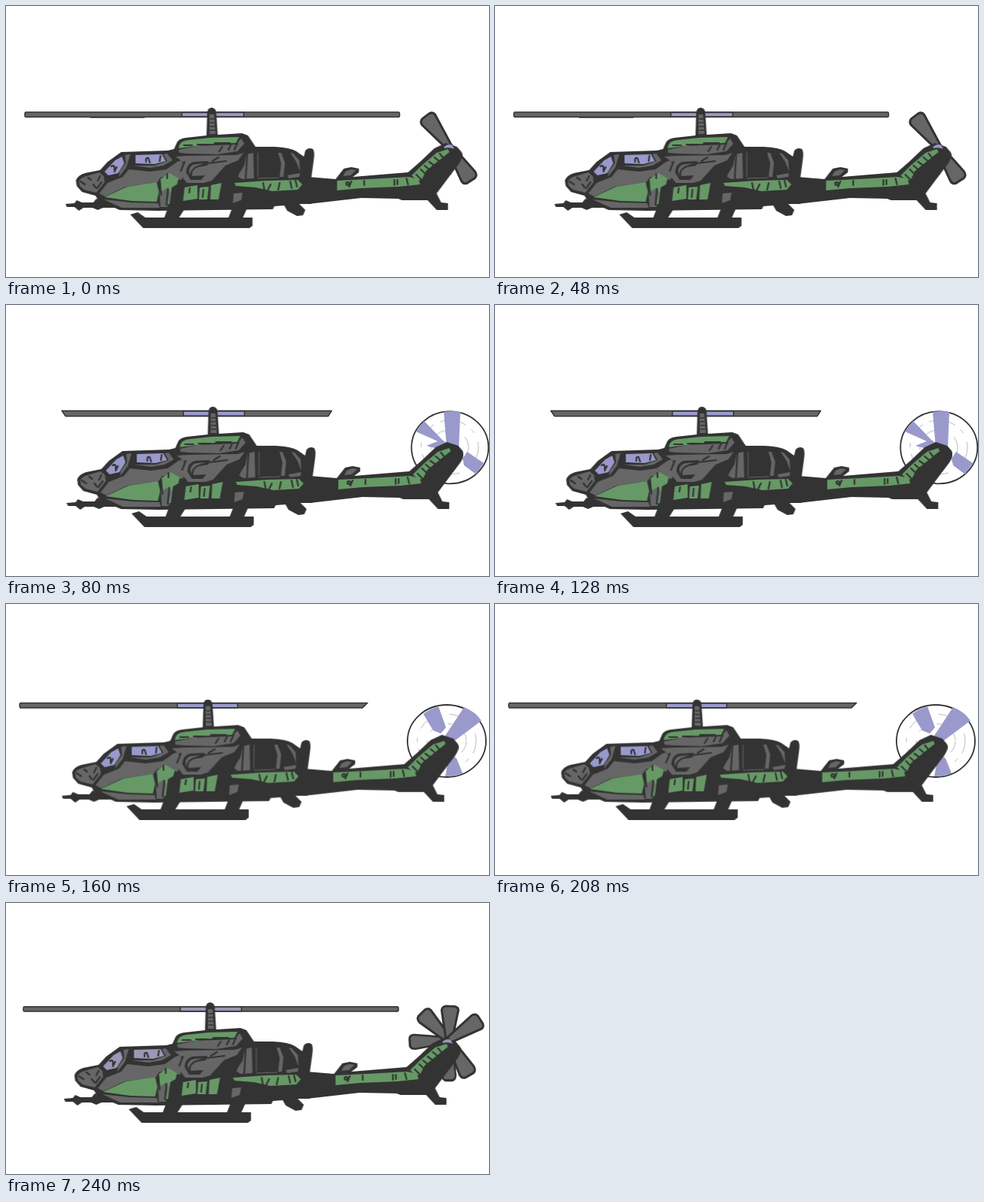
Write an HTML page that moves like this. It is 640 by 360 pixels and loops after 320 ms.

```html
<!DOCTYPE html>
<html lang="en">
<head>
<meta charset="utf-8">
<title>Helicopter</title>
<style>
  html, body { margin: 0; width: 100%; height: 100%; overflow: hidden; background: #fff; }
  svg { display: block; width: 100%; height: 100%; color: #9999cc; }
  .dark { fill: #333; }
  .grey { fill: #666; }
  .green { fill: #669966; }
  .lilac { fill: currentColor; }
  .edge { stroke: #333; stroke-width: 1.5; stroke-linejoin: round; }
  .ink { fill: none; stroke: #333; stroke-width: 2.2; stroke-linecap: round; stroke-linejoin: round; }
  .disc { fill: #fff; stroke: #333; stroke-width: 1.8; }
  .swirl { fill: none; stroke: #bbb; stroke-width: 1; stroke-dasharray: 17 9 6 13; }
  .pose { opacity: 0; }
</style>
</head>
<body>
<svg id="stage" viewBox="0 0 640 360">
  <defs>
    <path id="blade" d="M-4 0L-11-44Q-11-50-6-51L6-51Q11-50 11-45L4 0Z" fill="#666" stroke="#333" stroke-width="3" stroke-linejoin="round"/>
  </defs>

  <!-- Main and tail rotors, one group per pose -->
  <g class="pose">
    <rect class="grey edge" x="25" y="141" width="496.5" height="6.5" rx="1.5"/>
    <rect class="lilac edge" x="233" y="141.4" width="82" height="5.7"/>
    <path class="ink" style="stroke-width:1.2" d="M112 148.2H183"/>
    <g transform="translate(587 187)">
      <use href="#blade" transform="rotate(-37)"/>
      <use href="#blade" transform="rotate(147) scale(1 1.05)"/>
    </g>
  </g>
  <g class="pose">
    <path class="grey edge" d="M74 140.6H431.5L427 147.7H79Z"/>
    <rect class="lilac edge" x="235" y="141" width="81" height="6.3"/>
    <ellipse class="disc" cx="588.3" cy="189.3" rx="51" ry="48"/>
    <ellipse class="swirl" cx="588" cy="189" rx="38" ry="36"/>
    <ellipse class="swirl" cx="588" cy="189" rx="25" ry="23"/>
    <path class="lilac" d="M580 142Q591 140 602 142L600 190H584ZM543 168L554 154 578 179 590 188 576 192 557 187 572 181ZM605 204L611 195 633 210 623 225 607 213Z"/>
  </g>
  <g class="pose">
    <path class="grey edge" d="M19 131.5H479L472 138.1H19Q17 134 19 131.5Z"/>
    <rect class="lilac edge" x="227" y="131.9" width="80" height="5.8"/>
    <ellipse class="disc" cx="584" cy="182" rx="52" ry="48"/>
    <ellipse class="swirl" cx="584" cy="182" rx="39" ry="36"/>
    <ellipse class="swirl" cx="584" cy="182" rx="26" ry="23"/>
    <path class="lilac" d="M553 146Q562 139 573 136L583 164 576 172 566 168ZM607 137Q622 143 630 155L594 182 578 181ZM582 229L588 200 597 205 605 225Q594 229 582 229Z"/>
  </g>
  <g class="pose">
    <rect class="grey edge" x="23" y="137.7" width="497" height="6.4" rx="1.5"/>
    <rect class="lilac edge" x="231" y="138.1" width="81" height="5.6"/>
    <g transform="translate(587 182)">
      <use href="#blade" transform="rotate(180) scale(.8 1.05)"/>
      <use href="#blade" transform="rotate(150) scale(1 1.06)"/>
      <use href="#blade" transform="rotate(-93) scale(.85 1.02)"/>
      <use href="#blade" transform="rotate(-45)"/>
      <use href="#blade" transform="rotate(2) scale(1 .88)"/>
      <use href="#blade" transform="rotate(57) scale(1 .97)"/>
    </g>
  </g>

  <g id="body">
    <!-- Mast -->
    <path class="dark" d="M265 172L266 140Q267 134 272 134Q278 135 278 141L280 172Z"/>
    <path class="grey" d="M269 143H275L277 169H269Z"/>
    <path class="ink" style="stroke-width:1.5" d="M270 149h5M270 154h5M270 159h6M270 164h6"/>

    <!-- Silhouette: hull, tail, skids, gun -->
    <g class="dark">
      <path d="M92 231Q94 224 104 221L124 217 134 206 152 193 214 191 222 189 226 180Q229 175 238 174L265 171 312 168 320 171 330 186 355 186Q376 187 384 192L394 199 396 191Q400 186 406 189Q409 192 407 205L404 227V262H388L396 270 393 277 385 278 372 271 368 264 355 265 353 269 200 271 150 270 122 258 118 251 100 246 93 238Z"/>
      <path d="M400 226L436 229 447 215 457 213 467 215 467 220 459 226 532 220 548 206 567 188 582 181 597 186 603 193Q606 199 600 208L570 248 576 260 585 261V270H570L558 257H524L519 255 470 254 400 262Z"/>
      <path d="M164 276L174 273 184 280H326V291L322 294H181ZM214 267H237L227 283H208ZM300 265H320L312 283H293Z"/>
      <path d="M78 262L90 261 93 257 100 260H115L119 255 127 258 146 262V267H128L121 270 114 267H102L96 271 90 266H80Z"/>
    </g>

    <!-- Nose and cockpit -->
    <path class="grey" d="M96 232Q98 227 106 225L123 220 129 225 130 233 119 247 103 243 97 238Z"/>
    <path class="ink" d="M98 232L104 236M108 227L112 230M124 225L121 231M115 236L118 240M126 233L120 241"/>
    <path class="grey" d="M123 248L134 234 154 226 162 216 190 219 212 216 226 206 232 204 236 215 232 230 205 226 200 233 158 239 131 252Z"/>
    <path class="lilac" d="M130 219L144 204 153 199 156 208 148 221 135 224Z"/>
    <path class="lilac" d="M171 197L206 196 211 205 196 209 171 208Z"/>
    <path class="grey" d="M157 197L164 196 159 213 149 226 150 219 158 208ZM208 196L213 195 220 204 208 211 190 214 168 211 196 211 213 205Z"/>
    <path class="ink" d="M139 212Q144 209 143 217M143 219L146 213M185 206Q184 200 188 201L190 207M204 198L203 205"/>
    <path class="green" d="M130 253L160 239 199 233 202 246 199 259 166 258Z"/>
    <path class="grey" d="M129 256L165 260 201 261 203 267 153 267Z"/>
    <path class="green" d="M204 229L216 221 228 228 226 236 219 240 216 262 206 264Z"/>
    <path class="grey" d="M203 247L214 240 217 247 213 266 204 266Z"/>
    <path class="ink" d="M203 230L205 250M213 222V228M214 242L212 263"/>

    <!-- Cowling -->
    <path class="green" d="M229 184Q231 178 242 177L270 174 308 173 304 181 274 182 228 188Z"/>
    <path class="grey" d="M228 190L252 185 304 183 311 175 315 182 306 192 280 196 240 195 229 194Z"/>
    <path class="ink" d="M235 184H246M253 183H269M276 181H296M286 186L282 192M297 184L294 190M306 181L302 190"/>
    <path class="grey" d="M224 199L240 198 305 197 314 194 307 204 290 211 272 231 262 234 239 234 231 224 235 207Z"/>
    <path class="dark" d="M238 220Q239 208 248 206L268 205 266 211 254 213Q245 216 246 225L263 224 258 230 244 230Z"/>
    <path class="grey" d="M242 217Q244 209 252 209L262 208 251 212Q243 216 243 225Z"/>
    <path class="ink" d="M267 208L291 205M281 200L273 205M236 206L231 218"/>
    <path class="grey" d="M318 196L327 194 328 228 312 229 306 225 315 211Z"/>
    <path class="ink" d="M319 196L317 228M310 214L305 227"/>

    <!-- Rear engine -->
    <path class="grey" d="M360 194L364 194 369 207 367 226H362L364 208ZM376 194L380 195 388 204 389 219 384 206ZM372 224L389 221 388 226 374 228Z"/>
    <path d="M333 194V226M333 228L361 227" fill="none" stroke="#666" stroke-width="1"/>

    <!-- Side panels -->
    <path class="green" d="M236 240L253 237V255L234 258ZM256 240L268 239 266 256H255ZM271 237L285 234 281 256H270ZM302 234L345 231 386 230 392 236 386 243 352 245 330 240 304 238Z"/>
    <path class="grey" d="M301 248L313 247 311 257 300 261Z"/>
    <path class="ink" d="M243 241L242 247M261 243L260 253M340 234L342 244M350 236L346 244M362 234L360 243M376 232L378 241M383 231L385 239"/>

    <!-- Tail boom and fin -->
    <path class="green" d="M438 231L480 229 533 226 546 229 548 236 520 239 470 241 438 244Z"/>
    <path class="grey" d="M449 219L456 216 463 217 456 224 446 225Z"/>
    <circle cx="452" cy="235" r="1.8" fill="#fff" stroke="#333" stroke-width="2.5"/>
    <path class="ink" d="M457 232L454 239M474 231V237M514 230V237M518 230V236M530 228L532 236"/>
    <path class="green" d="M537 224L550 211 570 194 585 189 587 193 572 205 556 218 550 230 544 231Z"/>
    <path class="ink" d="M543 223L551 231M549 216L556 223M554 211L561 217M560 206L567 211M567 200L573 205M574 195L578 200"/>
    <path id="hub" class="lilac" d="M580 186Q585 181 591 184L593 189Q587 186 580 188Z"/>
  </g>
</svg>
<script>
  const loop = { duration: 320, iterations: Infinity };

  // Holds each value for an equal share of the loop, with hard changes.
  function hold(el, prop, values) {
    const frames = [...values, values.at(-1)].map(v => ({ [prop]: v, easing: "step-end" }));
    el.animate(frames, loop);
  }

  const stage = document.getElementById("stage");
  const sway = [[0.6, 1], [2.3, 1], [-4.4, -7.3], [-1.4, -2]];

  hold(document.getElementById("body"), "transform", sway.map(([x, y]) => `translate(${x}px, ${y}px)`));
  hold(document.getElementById("hub"), "opacity", [1, 0, 0, 1]);
  hold(stage, "color", ["#9999cc", "#9999cc", "#9999cc", "#9999b5"]);
  stage.querySelectorAll(".pose").forEach((pose, i) =>
    hold(pose, "opacity", sway.map((_, k) => k === i ? 1 : 0)));
</script>
</body>
</html>
```
